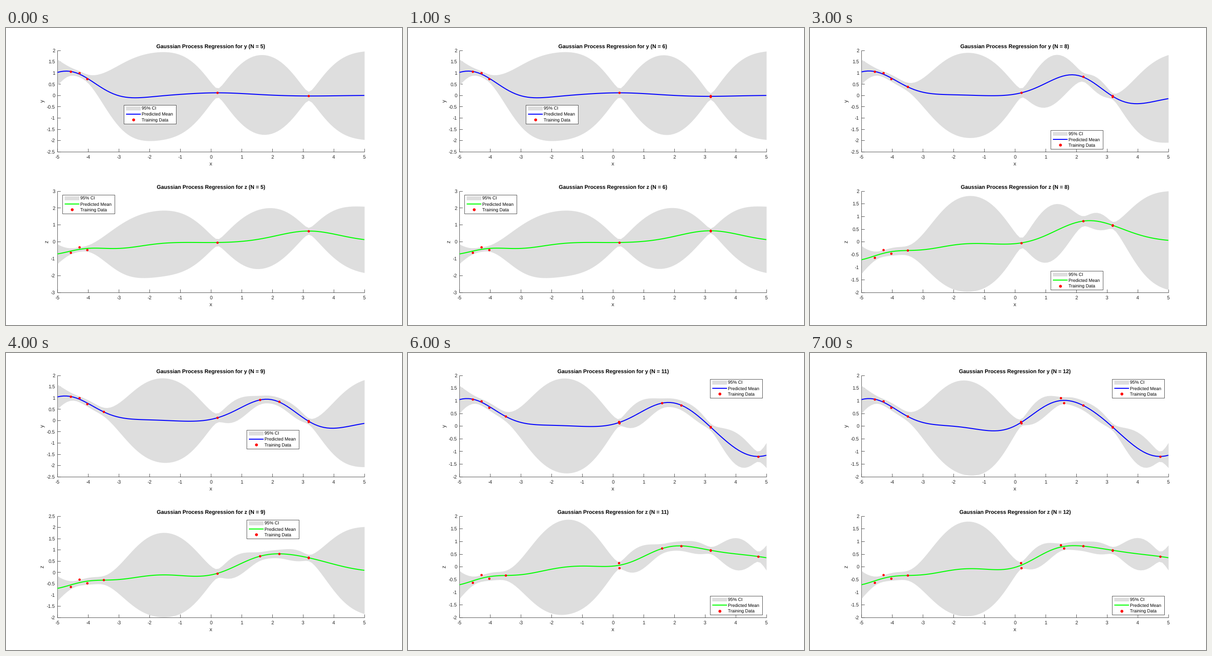
A matplotlib script for the animation above (8000 ms loop, 864 by 648 pixels).

```python
import math

import numpy as np
import matplotlib.pyplot as plt
from matplotlib.animation import FuncAnimation
from matplotlib.patches import Rectangle

plt.rcParams["font.family"] = "Liberation Sans"
plt.rcParams["text.hinting"] = "none"

W, H = 864, 648
LEFT, WIDTH, HEIGHT = 112.32, 669.6, 221.1
TOPS = (48.6, 355.6)
DARK, BAND = "#262626", "#dedede"
TICK = 6.7
SMALL, NORMAL, LARGE = 9.75, 10.67, 11.73

# Training samples (x, y, z) in order of arrival
SAMPLES = np.array([
    (-4.575, 1.056, -0.635), (-4.283, 0.985, -0.322), (-4.031, 0.725, -0.472),
    (0.214, 0.112, -0.05), (3.185, -0.03, 0.635), (3.18, -0.06, 0.66),
    (2.23, 0.822, 0.82), (-3.498, 0.384, -0.345), (1.596, 0.907, 0.72),
    (0.192, 0.158, 0.155), (4.736, -1.216, 0.403), (1.492, 1.105, 0.855),
])
FIRST = 5
NOISE_VAR = 0.01
GRID = np.linspace(-5, 5, 100)

# Legend cells (column, row), moved on after every second sample
Y_CELLS = ((1, 2), (3, 3), (3, 2), (4, 0))
Z_CELLS = ((0, 0), (3, 3), (3, 0), (4, 3))

fig = plt.figure(figsize=(W / 72, H / 72), dpi=72, facecolor="white")
ax = fig.add_axes([0, 0, 1, 1])


def kernel(a, b):
    return np.exp(-0.5 * (a[:, None] - b[None, :]) ** 2)


def regress(x, t):
    """Posterior mean and standard deviation on the grid."""
    cov = kernel(x, x) + NOISE_VAR * np.eye(len(x))
    cross = kernel(GRID, x)
    mean = cross @ np.linalg.solve(cov, t)
    var = 1 - np.sum(cross * np.linalg.solve(cov, cross.T).T, axis=1)
    return mean, np.sqrt(np.maximum(var, 0))


def nice_limits(low, high):
    """Round outwards to the finest step that needs at most nine intervals."""
    for step in (0.5, 1):
        first = math.floor(low / step)
        last = math.ceil((high - 0.01) / step)
        if last - first <= 9:
            break
    return first * step, last * step, step


def label(x, y, text, size=NORMAL, ha="center", color=DARK, **kw):
    ax.text(x, y, text, fontsize=size, ha=ha, va="baseline",
            color=color, zorder=6, **kw)


def stroke(xs, ys):
    ax.plot(xs, ys, color=DARK, lw=0.8, zorder=1, solid_capstyle="butt")


def dots(x, y, size, zorder):
    ax.plot(x, y, "o", ms=size, mfc="red", mec="none", zorder=zorder)


def px(x):
    return LEFT + WIDTH * (np.asarray(x) + 5) / 10


def draw_legend(top, cell, color):
    x = 123.2 + 134 * cell[0]
    y = top + 8.1 + 55.4 * cell[1]
    ax.add_patch(Rectangle((x, y), 113.3, 41, fc="white", ec=DARK,
                           lw=0.8, zorder=5))
    ax.add_patch(Rectangle((x + 4.3, y + 3.7), 32, 8.8, fc=BAND,
                           ec="none", zorder=6))
    ax.plot([x + 4.3, x + 36.3], [y + 20.3] * 2, color=color, lw=2.1,
            zorder=6, solid_capstyle="butt")
    dots(x + 20.5, y + 32.6, 6.3, 6)
    names = ("95% CI", "Predicted Mean", "Training Data")
    for i, name in enumerate(names):
        label(x + 39.3, y + 11.6 + 12.3 * i, name, SMALL, "left", "black")


def draw_panel(top, name, color, x, t, cell):
    bottom = top + HEIGHT
    mean, std = regress(x, t)
    lower, upper = mean - 2 * std, mean + 2 * std
    low, high, step = nice_limits(lower.min(), upper.max())

    def py(v):
        return bottom - HEIGHT * (np.asarray(v) - low) / (high - low)

    ax.fill_between(px(GRID), py(lower), py(upper), color=BAND, lw=0, zorder=2)
    ax.plot(px(GRID), py(mean), color=color, lw=2.1, zorder=3,
            solid_capstyle="butt")
    dots(px(x), py(t), 5.1, 4)

    stroke([LEFT, LEFT], [top, bottom])
    stroke([LEFT, LEFT + WIDTH], [bottom, bottom])
    for v in range(-5, 6):
        stroke([px(v)] * 2, [bottom, bottom - TICK])
        label(px(v), bottom + 15.5, str(v))
    for v in np.arange(low, high + step / 2, step):
        stroke([LEFT, LEFT + TICK], [py(v)] * 2)
        label(LEFT - 5.3, py(v) + 4.1, f"{v:g}", ha="right")

    label(LEFT + WIDTH / 2, bottom + 30, "x", LARGE)
    label(92.5 if step == 1 else 82.5, top + HEIGHT / 2, name, LARGE,
          rotation=90, rotation_mode="anchor")
    label(LEFT + WIDTH / 2, top - 4.1,
          f"Gaussian Process Regression for {name} (N = {len(x)})",
          LARGE, color="black", weight="bold")
    draw_legend(top, cell, color)


def draw(i):
    ax.clear()
    ax.set_xlim(0, W)
    ax.set_ylim(H, 0)
    ax.axis("off")
    x, y, z = SAMPLES[:FIRST + i].T
    draw_panel(TOPS[0], "y", "#0000ff", x, y, Y_CELLS[i // 2])
    draw_panel(TOPS[1], "z", "#00ff00", x, z, Z_CELLS[i // 2])
    return []


anim = FuncAnimation(fig, draw, frames=len(SAMPLES) - FIRST + 1,
                     init_func=lambda: [], interval=1000, repeat=True)
plt.show()
```
